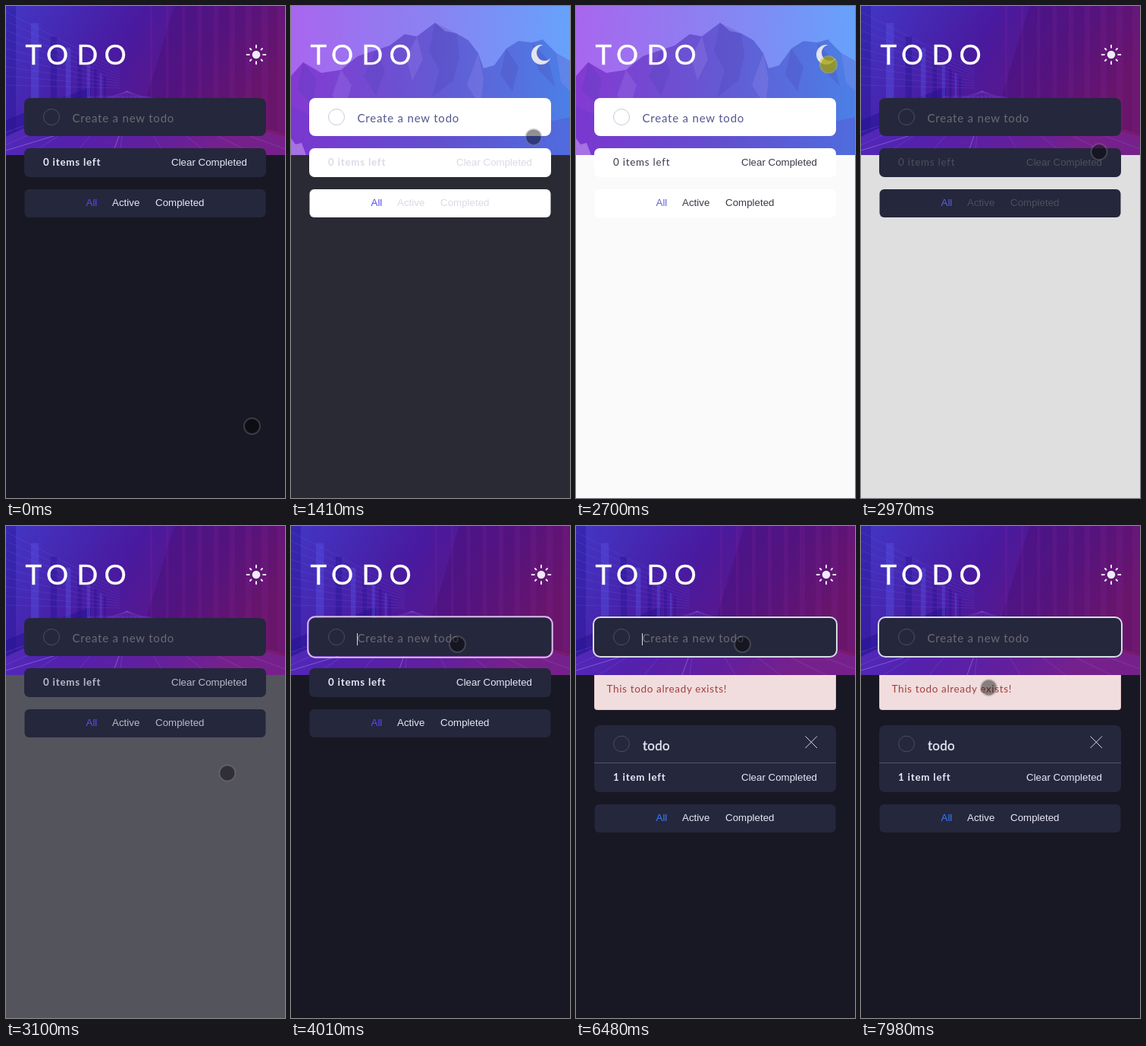
Animation of 368x647 px, one loop 8000 ms. Source, as an HTML page:

```html
<!DOCTYPE html>
<html lang="en">
<head>
<meta charset="utf-8">
<title>Todo</title>
<style>
html, body { margin: 0; width: 100%; height: 100%; overflow: hidden; background: #181824; }
svg { display: block; width: 100vw; height: 100vh; }
text { font-family: Lato, "Open Sans", sans-serif; white-space: pre; }
.btn { font: 13.333px "Liberation Sans", Arial, sans-serif; }
.field { font-size: 15px; letter-spacing: .8px; }
</style>
</head>
<body>
<svg viewBox="0 0 368 647" preserveAspectRatio="none">
  <defs>
    <linearGradient id="night" x1="0" y1="0" x2="1" y2=".35">
      <stop offset="0" stop-color="#4237c6"/>
      <stop offset=".45" stop-color="#491a9f"/>
      <stop offset=".75" stop-color="#5e1787"/>
      <stop offset="1" stop-color="#7b1a6d"/>
    </linearGradient>
    <linearGradient id="sky" x1="0" y1="0" x2="1" y2="0">
      <stop offset="0" stop-color="#a866ee"/>
      <stop offset=".5" stop-color="#8a82f2"/>
      <stop offset="1" stop-color="#66a2fb"/>
    </linearGradient>
    <linearGradient id="rock" x1="0" y1="0" x2="1" y2="0">
      <stop offset="0" stop-color="#8439d2"/>
      <stop offset=".5" stop-color="#6558d2"/>
      <stop offset="1" stop-color="#4b80e6"/>
    </linearGradient>
    <clipPath id="top"><rect width="368" height="196"/></clipPath>
  </defs>

  <rect id="page" width="368" height="647"/>

  <g id="alert">
    <rect x="24.5" y="187.5" width="318" height="54" rx="3" fill="#f1dddd" stroke="#e9cbce"/>
    <text x="40.5" y="218.5" font-size="13.5" letter-spacing=".65" fill="#a13f3f">This todo already exists!</text>
  </g>

  <g clip-path="url(#top)">
    <rect width="368" height="196" fill="url(#night)"/>
    <g id="hall">
      <path d="M0 196V172L112 118H186L368 172V196Z" fill="#6a34d0" opacity=".3"/>
      <path d="M186 118L222 0H368V168Z" fill="#3f0d68" opacity=".3"/>
      <path d="M112 118L0 172V150L112 106Z" fill="#241290" opacity=".5"/>
    </g>
    <g id="day">
      <rect width="368" height="196" fill="url(#sky)"/>
      <path d="M0 92L16 74 40 88 66 84 88 66 112 58 130 52 150 37 166 40 190 22 203 33 218 36 234 45 247 62 254 82 268 78 284 56 300 46 318 48 332 44 350 62 368 72V196H0Z" fill="url(#rock)"/>
      <path d="M190 22L182 60 196 84 186 120 214 98 222 66 218 36ZM112 58L96 92 112 118 124 86ZM284 56L276 90 292 112 300 80ZM16 74L8 110 28 130 34 96ZM318 48L326 84 348 106 340 72Z" fill="#4b3fae" opacity=".23"/>
      <path d="M166 40L152 68 160 98 174 70ZM66 84L54 118 70 138 80 104ZM247 62L232 104 250 132 254 96ZM350 62L356 100 368 112V72Z" fill="#bda0f5" opacity=".17"/>
      <path d="M0 132L40 150 92 144 140 168 206 150 262 170 368 146V196H0Z" fill="#5c33c4" opacity=".25"/>
      <path d="M0 174L6 182 14 180 20 196H0Z" fill="#c59af2" opacity=".6"/>
    </g>
  </g>

  <text x="25.5 53 93.5 129.5" y="77" font-size="36.5" fill="#fff" stroke="#fff" stroke-width=".4">TODO</text>
  <g id="sun" stroke="#eeecf8" stroke-width="2" stroke-linecap="round">
    <circle cx="330" cy="64" r="5.3" fill="#eeecf8" stroke="none"/>
  </g>
  <path id="moon" transform="translate(317 51)" fill="#e3e4ee" d="M13 0c.81 0 1.603.074 2.373.216C10.593 1.199 7 5.43 7 10.5 7 16.299 11.701 21 17.5 21c2.996 0 5.7-1.255 7.613-3.268C23.22 22.572 18.51 26 13 26 5.82 26 0 20.18 0 13S5.82 0 13 0z"/>

  <rect class="card" x="24" y="121" width="319" height="50" rx="8"/>
  <rect id="ring" fill="none" stroke-width="2"/>
  <circle class="check" cx="60" cy="146" r="10.5" fill="none"/>
  <text id="hint" class="field" x="87.5" y="152.5">Create a new todo</text>
  <text id="typed" class="field" x="87.5" y="152.5" fill="#e0e1ee"></text>
  <rect id="caret" y="141" width="1" height="16" fill="#dcdce6"/>

  <g id="list">
    <rect class="card" x="24" y="187" width="319" height="38" rx="7"/>
    <g id="item">
      <path class="card" d="M24 187V145a8 8 0 0 1 8-8H335a8 8 0 0 1 8 8V187Z"/>
      <circle class="check" cx="60" cy="161.5" r="10.3" fill="none"/>
      <text x="88" y="169.5" font-size="17" letter-spacing=".3" fill="#e6e7f4" stroke="#e6e7f4" stroke-width=".35">todo</text>
      <path d="M302.5 151.5L318 167M318 151.5L302.5 167" stroke="#d6d7e4"/>
    </g>
    <g id="joint">
      <rect class="card" x="24" y="186" width="319" height="12"/>
      <path d="M24 186.5H343" stroke="#51546c"/>
    </g>
    <text id="count" class="ink" x="49" y="209.5" font-size="13.3" letter-spacing=".8"></text>
    <text class="ink btn" x="218" y="210">Clear Completed</text>
    <rect class="card" x="24.5" y="241" width="318" height="37" rx="6"/>
    <text id="all" class="btn" x="105.5" y="263">All</text>
    <text class="ink btn" x="140" y="263">Active</text>
    <text class="ink btn" x="197" y="263">Completed</text>
  </g>

  <g id="cursor">
    <circle id="dot" r="10"/>
    <circle id="rim" r="10.5" fill="none" stroke-width="2"/>
  </g>
</svg>
<script>
const LOOP = 8000;
const FOCUS = 3870, ADD = 4810, REJECT = 6480;
const toLight = 1335, toDark = 2885, fadeDelay = 40, fadeTime = 400;
const presses = [[1150, 1290], [2700, 2840], [3800, 3930]];
const firstWord = [4140, 4400, 4480, 4550], secondWord = [5820, 5950, 6080, 6210];
// time, x, y
const path = [
  [40, 324.5, 552.5], [390, 316.5, 408.5], [560, 316.5, 408.5], [960, 331, 76],
  [1270, 331, 76], [1410, 320, 172], [1800, 308, 342], [2100, 308, 342],
  [2500, 333, 77], [2860, 333, 77], [3100, 292, 325], [3490, 278, 290],
  [3530, 278, 290], [3780, 219.5, 155.5], [7400, 219.5, 155.5], [7980, 168.5, 212.5]
];

const $ = id => document.getElementById(id);
const all = (cls, key, value) => document.querySelectorAll("." + cls).forEach(e => e.setAttribute(key, value));
const set = (id, attrs) => { for (const k in attrs) $(id).setAttribute(k, attrs[k]); };
const show = (id, on) => set(id, { visibility: on ? "visible" : "hidden" });
const clamp = v => Math.max(0, Math.min(1, v));
const mix = (a, b, u) => a + (b - a) * u;
const mixRgb = (a, b, u) => `rgb(${a.map((v, i) => Math.round(mix(v, b[i], u)))})`;
const bez = (p, q, s) => 3 * p * s * (1 - s) ** 2 + 3 * q * s * s * (1 - s) + s ** 3;

// The CSS "ease" curve
function ease(u) {
  let lo = 0, hi = 1;
  for (let i = 0; i < 20; i++) {
    const mid = (lo + hi) / 2;
    if (bez(.25, .25, mid) < u) lo = mid; else hi = mid;
  }
  return bez(.1, 1, lo);
}

function add(parent, tag, attrs) {
  const e = document.createElementNS("http://www.w3.org/2000/svg", tag);
  for (const k in attrs) e.setAttribute(k, attrs[k]);
  $(parent).append(e);
}

function buildSun() {
  for (let i = 0; i < 8; i++) {
    const a = i * Math.PI / 4, c = Math.cos(a), s = Math.sin(a);
    const near = i % 2 ? 9.3 : 9.2, far = i % 2 ? 11.3 : 12.3;
    add("sun", "path", { d: `M${330 + c * near} ${64 + s * near}L${330 + c * far} ${64 + s * far}` });
  }
}

// Corridor in perspective: pillars, ceiling beams and floor lines
function buildHall() {
  for (let i = 0; i < 9; i++) {
    const x = 150 * (1 - .78 ** i), w = 13 * .8 ** i;
    const rise = 112 * .8 ** i, drop = 52 * .8 ** i;
    add("hall", "rect", { x, y: 112 - rise, width: w, height: rise + drop,
      fill: i % 2 ? "#5a55e6" : "#24128e", opacity: .38 });
    add("hall", "path", { d: `M0 ${8 + i * 12}L150 ${84 + i * 3}`, stroke: "#7268ee", opacity: .2 });
    add("hall", "path", { d: `M160 112L${i * 60 - 90} 196`, stroke: "#9a6cf0", opacity: .25 });
    add("hall", "rect", { x: 190 + i * 21, y: 0, width: 3 + i * .8, height: 118 + i * 6,
      fill: "#8a2a9c", opacity: .16 });
  }
  add("hall", "path", { d: "M140 196L158 146M0 190L112 156", stroke: "#a98cf6", opacity: .5 });
}

function cursorAt(t) {
  const i = path.findIndex(p => p[0] > t);
  if (i === 0) return path[0].slice(1);
  if (i < 0) return path[path.length - 1].slice(1);
  const [t0, x0, y0] = path[i - 1], [t1, x1, y1] = path[i];
  const u = (t - t0) / (t1 - t0);
  return [mix(x0, x1, u), mix(y0, y1, u)];
}

const letters = (times, t) => times.filter(k => t >= k).length;

function drawTheme(t) {
  const light = t >= toLight && t < toDark;
  const fade = at => ease(clamp((t - at - fadeDelay) / fadeTime));
  const p = t < toDark ? fade(toLight) : 1 - fade(toDark);
  set("page", { fill: mixRgb([24, 24, 36], [250, 250, 250], p) });
  set("day", { opacity: clamp((t - toLight + 90) / 90) * (1 - clamp((t - toDark + 20) / 90)) });
  show("sun", !light);
  show("moon", light);
  all("card", "fill", light ? "#fff" : "#25273c");
  all("check", "stroke", light ? "#c9cbdb" : "#4b4e64");
  set("hint", { fill: light ? "#54578f" : "#6d6a74" });
  all("ink", "fill", mixRgb([232, 232, 246], [57, 58, 72], p));
  set("count", { "font-weight": p > .5 ? 400 : 700 });
  set("all", { fill: t >= ADD ? "#3a7cfd" : mixRgb([88, 74, 244], [91, 99, 222], p) });
}

function drawField(t) {
  const n = t < ADD ? letters(firstWord, t) : t < REJECT ? letters(secondWord, t) : 0;
  $("typed").textContent = "todo".slice(0, n);
  show("hint", n === 0);

  const focused = t >= FOCUS;
  show("ring", focused);
  const u = clamp((t - FOCUS) / 270), off = 1 + 7 * (1 - u) ** 3;
  set("ring", {
    x: 24 - off, y: 121 - off, width: 319 + 2 * off, height: 50 + 2 * off, rx: 8 + off,
    stroke: mixRgb([216, 190, 234], [211, 221, 228], clamp((t - 4010) / 130))
  });

  const marks = [FOCUS, ...firstWord, ADD, ...secondWord, REJECT].filter(k => k <= t);
  const since = t - marks[marks.length - 1];
  show("caret", focused && Math.floor(since / 500) % 2 === 0);
  set("caret", { x: 87 + (n ? $("typed").getComputedTextLength() : 0) });
}

function drawList(t) {
  const added = t >= ADD, rejected = t >= REJECT;
  set("list", { transform: `translate(0 ${rejected ? 125 : added ? 50 : 0})` });
  show("alert", rejected);
  show("item", added);
  show("joint", added);
  const u = ease(clamp((t - ADD) / 520));
  set("item", { transform: `translate(${-20 * (1 - u)} 0)`, opacity: u });
  $("count").textContent = added ? "1 item left" : "0 items left";
}

function drawCursor(t) {
  const down = presses.some(([a, b]) => t >= a && t < b);
  set("cursor", { transform: `translate(${cursorAt(t)})` });
  set("dot", { fill: down ? "rgba(165,162,0,.76)" : "rgba(0,0,0,.43)" });
  set("rim", { r: down ? 11 : 10.5, stroke: down ? "rgba(196,196,10,.5)" : "rgba(128,128,128,.34)" });
}

function frame() {
  const t = performance.now() % LOOP;
  drawTheme(t);
  drawField(t);
  drawList(t);
  drawCursor(t);
  requestAnimationFrame(frame);
}

buildSun();
buildHall();
frame();
</script>
</body>
</html>
```
